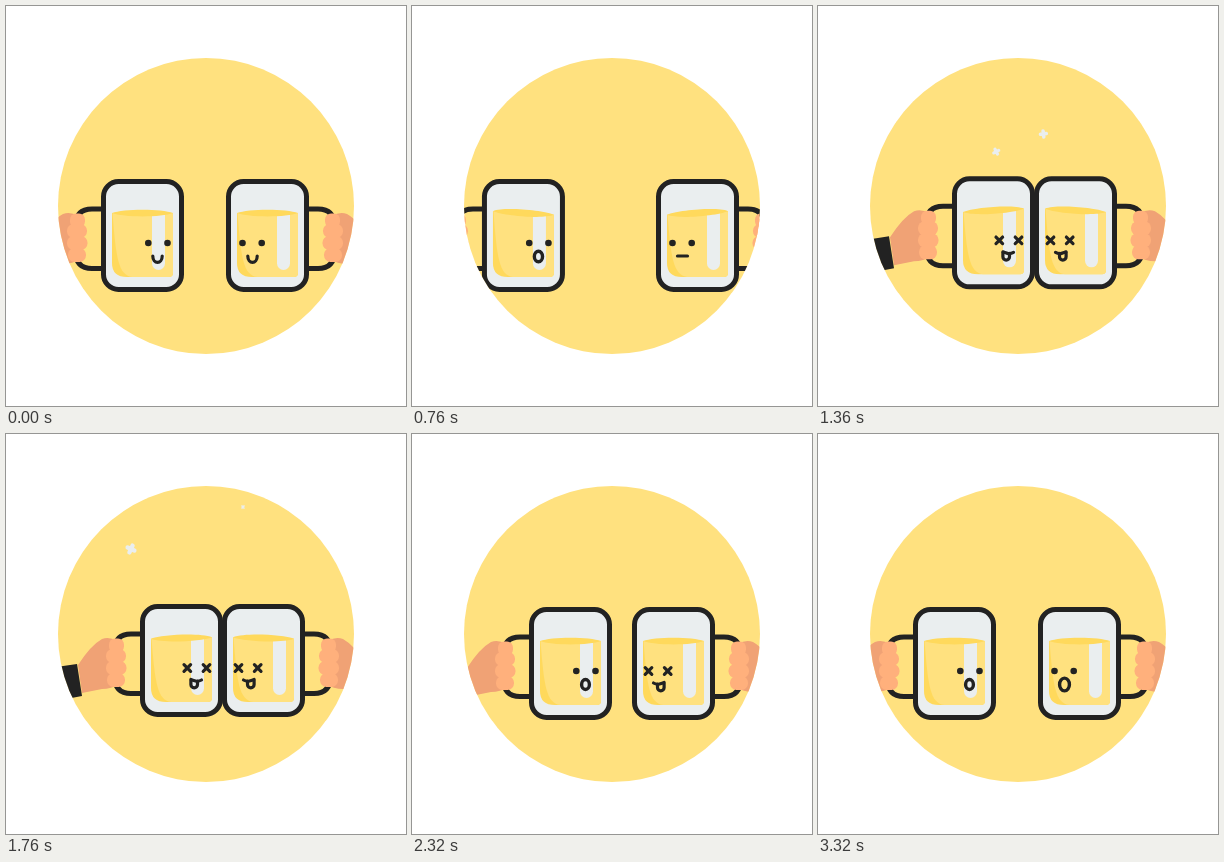
Recreate the animation shown at these times as an HTML page. Size 400x400 px, loop 3360 ms.

```html
<!DOCTYPE html>
<html lang="en">
<head>
<meta charset="utf-8">
<title>Cheers</title>
<style>
  html, body { margin: 0; width: 100%; height: 100%; overflow: hidden; background: #fff; }
  svg { display: block; width: 100vw; height: 100vh; }
  .line { fill: none; stroke: #222; stroke-linecap: round; stroke-linejoin: round; }
  .glass { fill: #eaeeef; stroke: #222; stroke-width: 5; }
  .gold { fill: #ffd95c; }
  .beer { fill: #ffe17f; }
  .shine { fill: #eaeeef; }
  .arm { fill: #f0a275; }
  .fist { fill: #ffb07c; }
  .ink { fill: #222; }
  .spark { fill: none; stroke: #eaeeef; stroke-width: 4.4; stroke-linecap: round; }
</style>
</head>
<body>
<svg viewBox="0 0 400 400">
  <defs>
    <clipPath id="disc"><circle cx="200" cy="200" r="148"/></clipPath>
    <!-- Everything that mirrors between the two mugs, drawn for the left one -->
    <g id="grip">
      <path class="arm" d="M33 234 Q46 214 57 208 Q64 205 72 210 L75 253 Q66 258 57 258 L37 262 Z"/>
      <path class="ink" d="M12 236 L32 233 L37 265 L16 269 Z"/>
      <path class="line" stroke-width="5" d="M97 203 H86 Q69.5 203 69.5 220 V245 Q69.5 262.500 86 262.500 H97"/>
      <g class="fist">
        <rect x="64" y="207.500" width="15" height="14" rx="6"/>
        <rect x="61" y="218" width="20" height="14" rx="6.500"/>
        <rect x="61" y="230" width="20.500" height="14" rx="6.500"/>
        <rect x="62" y="242" width="18" height="14" rx="6.500"/>
        <rect x="65" y="213" width="12" height="37"/>
      </g>
    </g>
  </defs>
  <circle class="beer" cx="200" cy="200" r="148"/>
  <g id="scene" clip-path="url(#disc)"></g>
</svg>
<script>
const LOOP = 3360, STEP = 40, HIT = 1280;
const scene = document.getElementById('scene');

const ease = {
  lin: u => u,
  in: u => u * u,
  out: u => 1 - (1 - u) * (1 - u),
  both: u => u * u * (3 - 2 * u)
};

// Keys are [time, value, easing of the way to this key]
function at(keys, t) {
  let a = keys[0];
  if (t <= a[0]) return a[1];
  for (const b of keys) {
    if (t < b[0]) {
      const u = (t - a[0]) / (b[0] - a[0]);
      return a[1] + (b[1] - a[1]) * ease[b[2] || 'both'](u);
    }
    a = b;
  }
  return a[1];
}

function add(parent, tag, attrs = {}) {
  const el = document.createElementNS('http://www.w3.org/2000/svg', tag);
  for (const k in attrs) el.setAttribute(k, attrs[k]);
  parent.append(el);
  return el;
}

const set = (el, name, value) => el.setAttribute(name, value);
const show = (el, on) => set(el, 'display', on ? 'inline' : 'none');

function makeFace(parent, flip) {
  const face = add(parent, 'g', { transform: flip ? 'translate(56.500 77) scale(-1 1)' : 'translate(26.500 77)' });
  const dots = add(face, 'g', { class: 'ink' });
  const dizzy = add(face, 'g', { class: 'line', 'stroke-width': 3.2 });
  for (const x of [-10, 9.2]) {
    add(dots, 'circle', { cx: x, cy: -13, r: 3.3 });
    add(dizzy, 'path', { d: `M${x - 3.3} -16.300l6.600 6.600m0 -6.600l-6.600 6.600` });
  }
  add(dizzy, 'path', { d: 'M-1 0 V3.500 A3.300 3.300 0 0 0 5.600 3.500 V-.5' });
  add(dizzy, 'path', { d: 'M-5 -1 Q-2 .8 1 0 T5.600 -1.500' });
  const lips = add(face, 'path', { class: 'line', 'stroke-width': 3.2 });
  const gasp = add(face, 'ellipse', { class: 'line', 'stroke-width': 3.4, cy: .5 });

  return (t, m) => {
    const out = t >= HIT && t < m.wake;
    const open = out ? 0 : at(m.open, t);
    const smile = at(m.smile, t);
    show(dots, !out);
    show(dizzy, out);
    show(gasp, open > 0);
    show(lips, !out && !open);
    set(gasp, 'rx', 4.1 * open);
    set(gasp, 'ry', 5.3 * open);
    const w = 5 - .3 * smile, d = 8.600 * smile;
    set(lips, 'd', `M${-w} 0C${-w} ${d} ${w} ${d} ${w} 0`);
  };
}

function makeMug(m) {
  const root = add(scene, 'g');
  add(root, 'use', { href: '#grip', transform: m.flip ? '' : 'translate(398 0) scale(-1 1)' });
  const body = add(root, 'g', { transform: `translate(${m.left} 173)` });
  add(body, 'rect', { class: 'glass', x: 2.5, y: 2.5, width: 78, height: 108, rx: 15 });
  const back = add(body, 'path', { class: 'gold' });
  const beer = add(body, 'path', { class: 'beer' });
  add(body, 'path', { class: 'shine', d: 'M51 33 H64 V84.500 A6.500 6.500 0 0 1 51 84.500 Z' });
  const top = add(body, 'path', { class: 'gold' });
  const face = makeFace(body, m.flip);

  return t => {
    set(root, 'transform', `translate(${at(m.x, t)} ${at(m.y, t)})`);
    const slope = at(tilt, t) * (m.flip ? 1 : -1);
    const a = 34 - slope / 2, b = 34 + slope / 2;
    set(back, 'd', `M11 ${a}L72 ${b}V94Q72 98 68 98H26Q11 98 11 84Z`);
    set(beer, 'd', `M11.500 ${a}L72 ${b}V94Q72 98 68 98H31C17 96 15 78 11.500 ${a}Z`);
    set(top, 'd', `M11 ${a}C22 ${a - 4.500} 61 ${b - 4.500} 72 ${b}C61 ${b + 4.500} 22 ${a + 4.500} 11 ${a}Z`);
    face(t, m);
  };
}

function makeSpark(x, y, turn, size) {
  const el = add(scene, 'path', { class: 'spark', d: 'M-3.700 0H3.700M0 -3.700V3.700' });
  return t => {
    const u = Math.min(1, Math.max(0, (t - HIT) / 480));
    const p = 1 - (1 - u) ** 3;
    const s = at(size, t);
    show(el, s > 0);
    set(el, 'transform', `translate(${217 + (x - 217) * p} ${168 + (y - 168) * p}) rotate(${turn + 90 * (p - 1)}) scale(${s})`);
  };
}

// Slosh of the left mug; the right one mirrors it
const tilt = [[0, 0], [200, 2], [400, -5], [640, 3], [1040, 6], [HIT, 7],
  [1400, -7], [1560, 4], [1760, -1.5], [1960, 1], [2200, 0]];

const parts = [
  makeMug({
    left: 95, flip: true, wake: 2160,
    x: [[0, 0], [400, -30], [570, -30], [HIT, 39, 'in'], [1800, 39], [2320, 22], [2840, 9, 'lin'], [3320, 0, 'out']],
    y: [[HIT, 0], [1400, -3, 'out'], [1780, -3], [2080, 0]],
    open: [[200, 0], [360, 1], [960, 1], [1040, .95]],
    smile: [[40, 1], [200, 0], [HIT, 0], [HIT + 1, 1]]
  }),
  makeMug({
    left: 220, flip: false, wake: 2480,
    x: [[0, 0], [400, 30], [570, 30], [HIT, -4], [1780, -4], [2080, 0]],
    y: [[HIT, 0], [1400, -3, 'out'], [1780, -3], [2080, 0], [2400, 0], [2860, 6.2], [3320, 0]],
    open: [[920, 0], [1120, 1.2]],
    smile: [[40, 1], [240, 0], [HIT, 0], [HIT + 1, 1]]
  }),
  makeSpark(125, 115, 25, [[HIT, 0], [1400, 1], [1760, 1], [1920, 0]]),
  makeSpark(237, 73, 45, [[HIT, 0], [1440, 1.6], [1640, 1.6], [1760, .38], [1800, 0]])
];

const start = performance.now();
function frame() {
  const now = Math.max(0, performance.now() - start) % LOOP;
  const t = Math.floor(now / STEP) * STEP;
  parts.forEach(draw => draw(t));
  requestAnimationFrame(frame);
}
frame();
</script>
</body>
</html>
```
